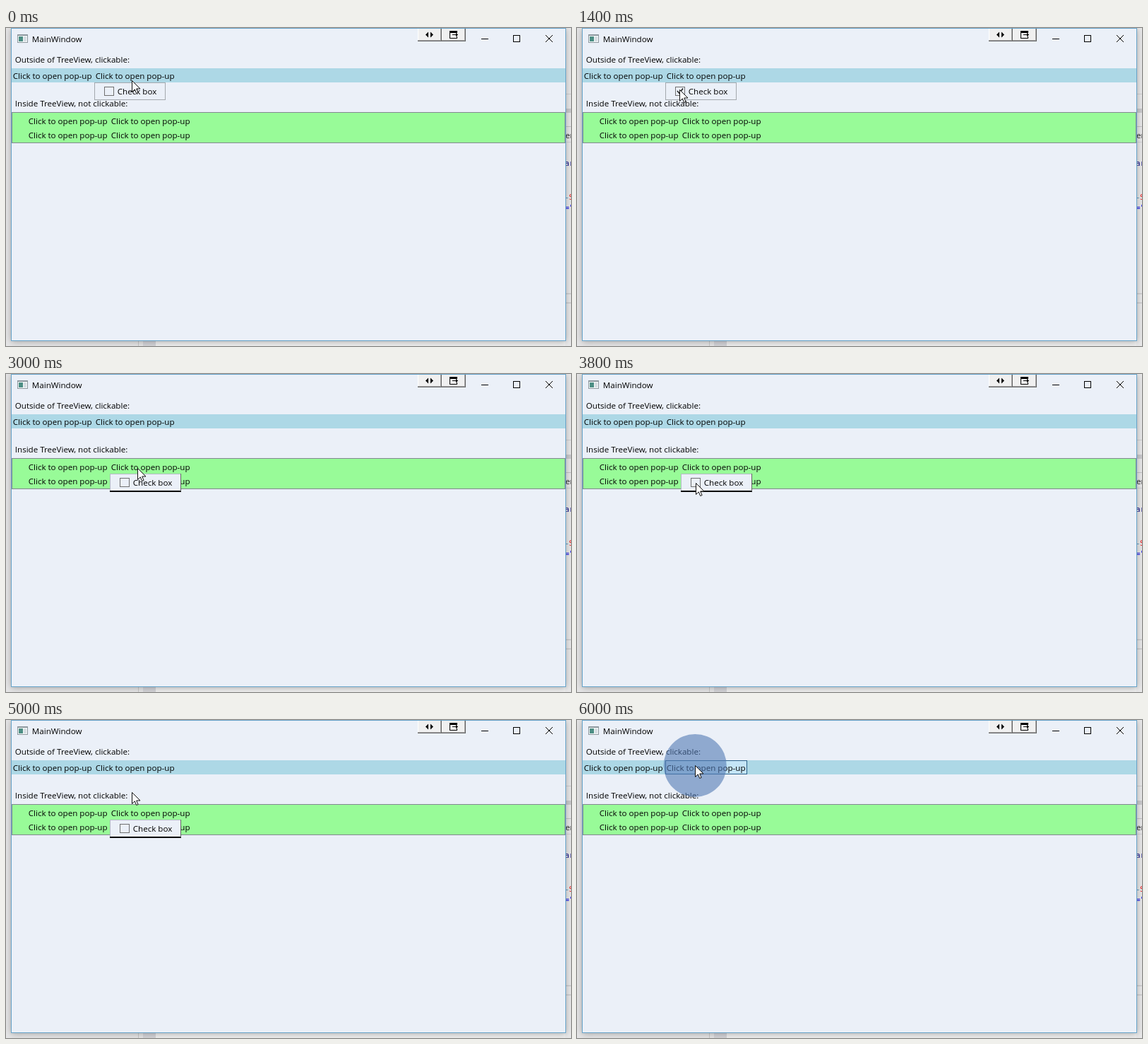
An HTML page with a canvas for the animation above (6200 ms loop, 800 by 450 pixels).

```html
<!DOCTYPE html>
<html lang="en">
<head>
<meta charset="utf-8">
<title>Pop-up demo</title>
<style>
  html, body { margin: 0; width: 100%; height: 100%; overflow: hidden; }
  canvas { display: block; }
</style>
</head>
<body>
<canvas id="stage" width="800" height="450"></canvas>
<script>
const ctx = document.getElementById('stage').getContext('2d');
const LOOP = 6200, STEP = 200;
const FACE = '#ebf0f8', LABEL = 'Click to open pop-up';
const UI_FONT = '11.6px "Open Sans", "Noto Sans", sans-serif';
const CODE_FONT = '11px "DejaVu Sans Mono", monospace';

// Pointer stops: time, x, y
const stops = [
  [0, 178, 74], [200, 178, 74], [800, 145, 87], [1400, 145, 87],
  [1800, 160, 115], [2200, 160, 115], [2600, 186, 133], [3200, 186, 133],
  [3800, 168, 154], [4400, 168, 154], [5000, 178, 102], [5400, 178, 102],
  [5800, 167, 64], [LOOP, 167, 64]
];
// Times while the mouse button is marked as pressed
const clicks = [[1000, 1400], [2000, 2400], [2600, 3000], [4000, 4600], [5200, 5600], [6000, LOOP]];
const arrow = new Path2D('M0 0V16L3.8 12.4 6.2 18 8.6 17 6.2 11.5H11.5Z');

const within = (t, a, b) => t >= a && t < b;

function box(x, y, w, h, fill) {
  ctx.fillStyle = fill;
  ctx.fillRect(x, y, w, h);
}

function frame(x, y, w, h, color) {
  ctx.strokeStyle = color;
  ctx.lineWidth = 1;
  ctx.strokeRect(x + .5, y + .5, w - 1, h - 1);
}

function text(str, x, y, color = '#000', font = UI_FONT) {
  ctx.font = font;
  ctx.fillStyle = color;
  ctx.fillText(str, x, y);
}

function line(points, color = '#000', width = 1) {
  ctx.beginPath();
  points.forEach(([x, y]) => ctx.lineTo(x, y));
  ctx.strokeStyle = color;
  ctx.lineWidth = width;
  ctx.stroke();
}

// Solid horizontal arrowhead; a negative size points left
function head(x, y, size) {
  const half = Math.abs(size);
  ctx.beginPath();
  ctx.moveTo(x, y);
  ctx.lineTo(x - size, y - half);
  ctx.lineTo(x - size, y + half);
  ctx.fillStyle = '#000';
  ctx.fill();
}

function drawBackdrop() {
  box(0, 0, 800, 450, '#e6e6e7');
  box(212, 443, 588, 7, '#f0f0f0');
  box(187, 443, 1, 7, '#c8c8c8');
  box(194, 443, 18, 7, '#d4d4d8');
  box(792, 0, 8, 450, '#e9e9ea');
  box(792, 93, 8, 1, '#cfcfd1');
  box(792, 114, 8, 6, '#cbcbce');
  box(792, 139, 8, 1, '#c4c4c6');
  box(792, 161, 8, 1, '#d2d2d4');
  box(792, 375, 8, 2, '#d2d2d4');
  box(792, 388, 8, 2, '#d2d2d4');
  text('er', 792, 156, '#222');
  text('ar', 791, 195, '#14148c', CODE_FONT);
  text('-', 791, 243, '#4a90c0', CODE_FONT);
  text('S', 797, 243, '#e22', CODE_FONT);
  text('="', 791, 258, '#00e', CODE_FONT);
  // Soft shadow around the window
  ctx.save();
  ctx.shadowColor = 'rgba(0,0,0,.3)';
  ctx.shadowBlur = 9;
  ctx.shadowOffsetY = 1;
  box(7, 0, 786, 443, FACE);
  ctx.restore();
}

function drawToolButton(x) {
  box(x, 0, 34, 19, '#696969');
  box(x, 0, 33, 18, '#a0a0a0');
  box(x, 0, 32, 17, '#fff');
  box(x + 1, 0, 31, 17, '#f0f0f0');
}

function drawTitleBar() {
  box(16, 9, 15, 12, '#8c979e');
  box(17, 11, 13, 9, '#f7fafa');
  box(18, 12, 6, 7, '#4c8e84');
  box(25, 12, 4, 7, '#d5dde2');
  text('MainWindow', 36.8, 20);

  drawToolButton(583);
  drawToolButton(617);
  head(594, 9.5, -4);
  head(605, 9.5, 4);
  frame(628, 4, 11, 11, '#000');
  box(628, 4, 11, 3, '#000');
  box(637, 7, 3, 5, '#f0f0f0');
  box(632, 9, 6, 1, '#000');
  head(640, 9.5, 3);

  box(673, 15, 10, 1, '#000');
  frame(718, 10, 10, 10, '#000');
  line([[764, 10], [774, 20]]);
  line([[774, 10], [764, 20]]);
}

function drawItem(x, y, state) {
  if (state) {
    box(x, y, 116, 20, state === 'down' ? '#c4e5f6' : '#bee6fd');
    frame(x, y, 116, 20, state === 'down' ? '#2c628b' : '#3c7fb1');
  }
  text(LABEL, x + 1.7, y + 15);
}

function drawPopup(x, y, { raised, checked, pressed }) {
  box(x, y, 101, 25, FACE);
  frame(x, y, 101, 25, raised ? '#b4bcc4' : '#a4a9ae');
  if (raised) {
    box(x, y + 24, 101, 2, '#000');
    box(x + 100, y, 1, 25, '#666');
  }
  if (pressed) box(x + 14, y + 6, 14, 13, '#d9ecff');
  frame(x + 14, y + 6, 14, 13, pressed ? '#3c77dd' : '#707070');
  if (checked) line([[x + 17, y + 12], [x + 20, y + 15.5], [x + 25, y + 8.5]], '#212121', 1.6);
  text('Check box', x + 32.8, y + 17);
}

function pointerAt(t) {
  const i = stops.findIndex(s => s[0] > t);
  const [t0, x0, y0] = stops[i - 1], [t1, x1, y1] = stops[i];
  const k = (t - t0) / (t1 - t0), e = k * k * (3 - 2 * k);
  return [Math.round(x0 + (x1 - x0) * e), Math.round(y0 + (y1 - y0) * e)];
}

function drawPointer(t, pressed) {
  const [x, y] = pointerAt(t);
  if (pressed) {
    ctx.beginPath();
    ctx.arc(x + .2, y + .4, 44.5, 0, 2 * Math.PI);
    ctx.fillStyle = 'rgba(82,122,180,.6)';
    ctx.fill();
  }
  ctx.save();
  ctx.translate(x + .5, y + .5);
  ctx.fillStyle = '#fff';
  ctx.fill(arrow);
  ctx.strokeStyle = '#111';
  ctx.lineWidth = 1;
  ctx.stroke(arrow);
  ctx.restore();
}

function draw(now) {
  const t = Math.floor(now % LOOP / STEP) * STEP;
  const pressed = clicks.some(([a, b]) => within(t, a, b));
  drawBackdrop();
  drawTitleBar();
  text('Outside of TreeView, clickable:', 12.8, 49);
  text('Inside TreeView, not clickable:', 12.8, 111);

  box(8, 57, 784, 20, '#add8e6');
  drawItem(8, 57);
  drawItem(125, 57, t >= 6000 ? 'down' : t >= 5800 && 'hover');

  box(8, 119, 784, 44, '#98fb98');
  frame(8, 119, 784, 44, '#828790');
  drawItem(30, 121);
  drawItem(147, 121, within(t, 2600, 3000) && 'down');
  drawItem(30, 141);
  drawItem(147, 141);
  frame(7, 0, 786, 443, '#66a3c9');

  if (t < 2000) drawPopup(125, 77, { checked: t >= 1400, pressed });
  if (within(t, 3000, 5400)) drawPopup(147, 141, { raised: true, pressed: pressed && t < 5000 });
  drawPointer(t, pressed);
}

const start = performance.now();
function tick() {
  draw(performance.now() - start);
  requestAnimationFrame(tick);
}
tick();
</script>
</body>
</html>
```
